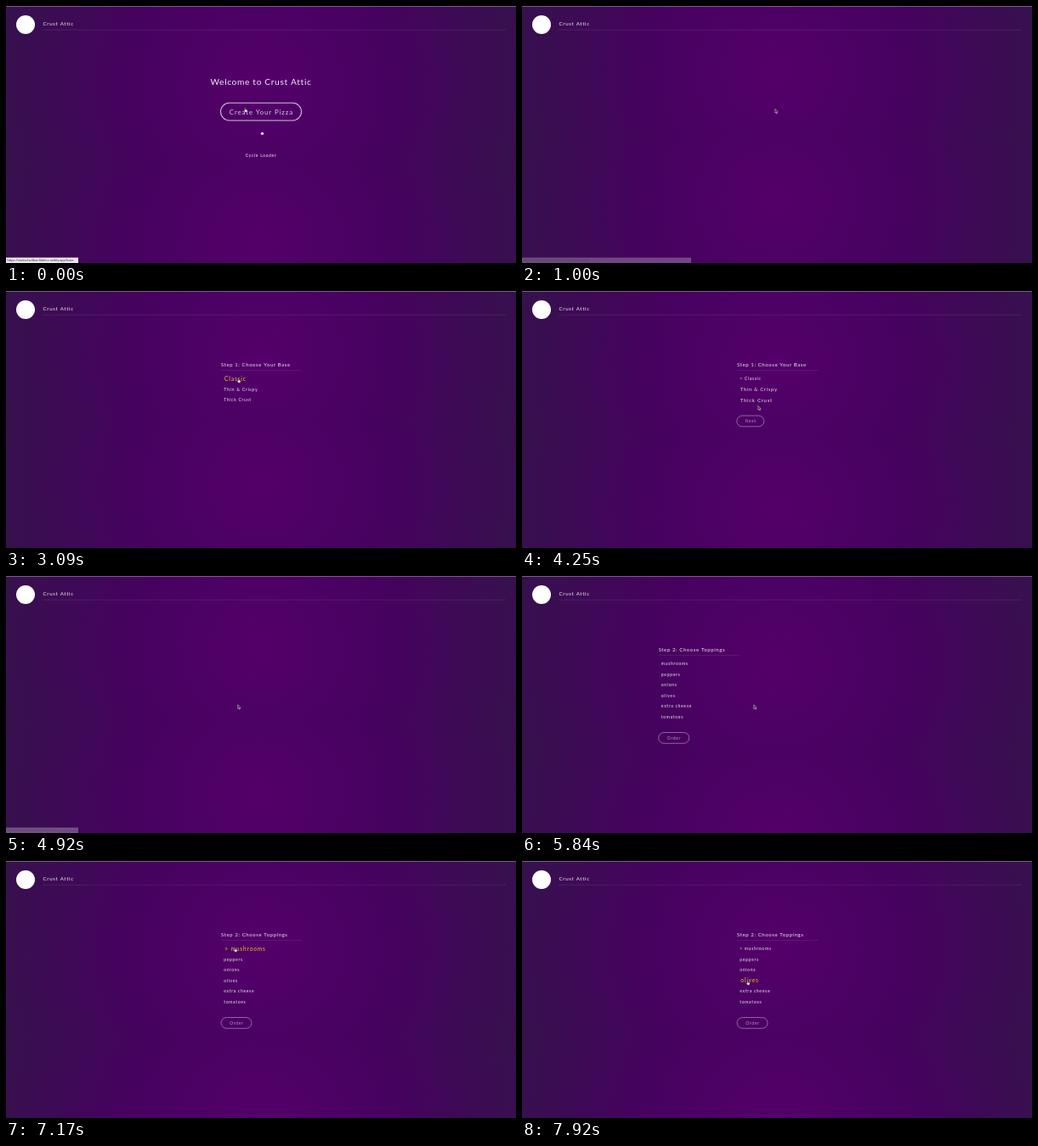
Animation, 600 px wide and 303 px high, one loop 8 s. Source, as an HTML page with a canvas:

```html
<!DOCTYPE html>
<html lang="en">
<head>
<meta charset="utf-8">
<title>Pizza order</title>
<style>
  html, body { margin: 0; width: 100%; height: 100%; overflow: hidden; background: #45055a; }
  canvas { display: block; width: 600px; height: 303px; }
</style>
</head>
<body>
<canvas></canvas>
<script>
const W = 600, H = 303, LOOP = 8000, LEFT = 253, ROW = 12.55, TRACKING = 0.65;
const canvas = document.querySelector('canvas');
const ctx = canvas.getContext('2d');
const dpr = window.devicePixelRatio || 1;
canvas.width = W * dpr;
canvas.height = H * dpr;

const BRAND = 'Crust Attic';
const SITE = 'https://stoked-willow-0a6fcc.netlify.app/';

const home = { exit: 504 };
const base = {
  title: 'Step 1: Choose Your Base', items: ['Classic', 'Thin & Crispy', 'Thick Crust'],
  enter: 1304, hoverFrom: 2080, picked: 3349, exit: 4698,
  button: { label: 'Next', y: 153.4, width: 32, slideIn: 3349 }
};
const toppings = {
  title: 'Step 2: Choose Toppings',
  items: ['mushrooms', 'peppers', 'onions', 'olives', 'extra cheese', 'tomatoes'],
  enter: 5510, hoverFrom: 6480, picked: 7150, exit: Infinity,
  button: { label: 'Order', y: 190.9, width: 36 }
};

// Pointer path: time, x, y
const pointerPath = [
  [0, 282, 122], [450, 282, 122], [1000, 299, 124], [1800, 299, 124], [2170, 298, 118],
  [2500, 296, 117], [3100, 274, 105], [3900, 272, 104], [4250, 279, 138], [4500, 273, 154],
  [5000, 274, 154.5], [6300, 274, 154.5], [6500, 272, 151], [6950, 270, 104], [7300, 270, 104],
  [7800, 266, 143], [8000, 266, 143]
];

const clamp = v => Math.max(0, Math.min(1, v));
const lerp = (a, b, u) => a + (b - a) * u;
const easeInOut = u => u < 0.5 ? 2 * u * u : 1 - 2 * (1 - u) ** 2;

// Remaining distance (1 to 0) of a damped spring
function spring(ms, stiffness) {
  if (ms <= 0) return 1;
  const s = ms / 1000, f = Math.sqrt(stiffness - 25);
  return Math.exp(-5 * s) * (Math.cos(f * s) + 5 / f * Math.sin(f * s));
}

const exitShift = (t, start) => -W * easeInOut(clamp((t - start) / 300));

function pointerAt(t) {
  const i = Math.max(1, pointerPath.findIndex(p => p[0] >= t));
  const [t0, x0, y0] = pointerPath[i - 1], [t1, x1, y1] = pointerPath[i];
  const u = clamp((t - t0) / (t1 - t0)), s = u * u * (3 - 2 * u);
  return { x: lerp(x0, x1, s), y: lerp(y0, y1, s) };
}

const rowY = i => 103.2 + i * ROW;

function isOver(page, i, t) {
  if (t < page.hoverFrom || t > page.exit) return false;
  const p = pointerAt(t);
  return p.x > LEFT && p.x < 348 && Math.abs(p.y - rowY(i)) < ROW / 2;
}

// Hover strength follows the recent pointer position
function hoverAmount(page, i, t) {
  let hits = 0;
  for (let k = 0; k < 13; k++) hits += isOver(page, i, t - k * 20);
  return hits / 13;
}

function text(str, x, y, size, { color = 'rgba(255,255,255,0.92)', weight = 400, spacing = TRACKING, align = 'left', family = 'Lato' } = {}) {
  ctx.font = `${weight} ${size}px ${family}, sans-serif`;
  ctx.letterSpacing = spacing + 'px';
  ctx.textAlign = align;
  ctx.textBaseline = 'alphabetic';
  ctx.fillStyle = color;
  ctx.fillText(str, x, y + size * 0.34);
}

function line(x0, x1, y) {
  ctx.fillStyle = 'rgba(255,255,255,0.14)';
  ctx.fillRect(x0, y, x1 - x0, 0.6);
}

function pill(x, y, w, h, lineWidth, color) {
  ctx.beginPath();
  ctx.roundRect(x, y, w, h, h / 2);
  ctx.lineWidth = lineWidth;
  ctx.strokeStyle = color;
  ctx.stroke();
}

function disc(x, y, r) {
  ctx.beginPath();
  ctx.arc(x, y, r, 0, 2 * Math.PI);
  ctx.fillStyle = '#fff';
  ctx.fill();
}

// The glow repeats with the height of the page content
function drawBackground(t) {
  const tile = t < 804 ? 186 : t < base.picked ? 152 : t < 4998 ? 171 : 208;
  for (let y = 0; y < H; y += tile) {
    const cy = y + tile / 2;
    const glow = ctx.createRadialGradient(W / 2, cy, 0, W / 2, cy, Math.hypot(W / 2, tile / 2));
    glow.addColorStop(0, 'rgb(84,0,106)');
    glow.addColorStop(0.5, 'rgb(70,2,95)');
    glow.addColorStop(1, 'rgb(54,17,77)');
    ctx.fillStyle = glow;
    ctx.fillRect(0, y, W, tile);
  }
  ctx.fillStyle = 'rgba(255,255,255,0.4)';
  ctx.fillRect(0, 0, W, 0.8);
}

function drawHeader() {
  disc(23, 22, 11);
  text(BRAND, 43.5, 21.3, 6.2);
  line(43, 588, 27.8);
}

function drawHome(t) {
  if (t > home.exit + 300) return;
  ctx.save();
  ctx.translate(W / 2 + exitShift(t, home.exit), 0);
  text('Welcome to ' + BRAND, 0, 89.5, 10.2, { align: 'center' });

  ctx.save();
  const pulse = 1 + 0.05 * Math.sin(t / 600 * 2 * Math.PI);
  ctx.translate(0, 124.6);
  ctx.scale(pulse, pulse);
  pill(-47.5, -10.3, 95, 20.6, 1, 'rgba(255,255,255,0.75)');
  text('Create Your Pizza', 0.4, 0.4, 7.8, { align: 'center', color: 'rgba(255,255,255,0.8)', spacing: 0.9 });
  ctx.restore();

  const phase = t / 1000 * 2 * Math.PI + 0.24;
  disc(6.2 * Math.sin(phase), 159.2 - 9.4 * Math.cos(phase) ** 2, 1.6);
  text('Cycle Loader', 0, 176.2, 5.1, { align: 'center' });
  ctx.restore();
}

function drawButton({ label, y, width, slideIn }, t) {
  const shift = slideIn ? -W * spring(t - slideIn, 110) : 0;
  const x = LEFT + shift;
  pill(x, y - 6.4, width, 12.8, 0.7, 'rgba(255,255,255,0.55)');
  text(label, x + width / 2 + 0.3, y + 0.2, 5, { align: 'center', color: 'rgba(255,255,255,0.6)' });
}

function drawMenu(page, t) {
  if (t < page.enter || t > page.exit + 300) return;
  const rest = spring(t - page.enter, 100);
  ctx.save();
  ctx.globalAlpha = clamp(1 - rest);
  ctx.translate(W * rest + exitShift(t, page.exit), 0);
  text(page.title, LEFT, 86.8, 5.9);
  line(LEFT, 348, 93.2);
  page.items.forEach((item, i) => {
    const hover = hoverAmount(page, i, t), tint = hover ** 3;
    const scale = 1 + 0.3 * Math.sin(hover * Math.PI / 2);
    const label = i === 0 && t >= page.picked ? '> ' + item : item;
    ctx.save();
    ctx.translate(LEFT, rowY(i));
    ctx.scale(scale, scale);
    text(label, 3.2, 0.2, 5.1, { color: `rgba(${lerp(255, 248, tint)},${lerp(255, 225, tint)},${lerp(255, 18, tint)},0.9)` });
    ctx.restore();
  });
  drawButton(page.button, t);
  ctx.restore();
}

function drawStatus(t) {
  const first = t < 1090;
  const alpha = first ? clamp((1080 - t) / 200) : clamp((t - 4420) / 80) * clamp((5000 - t) / 250);
  if (!alpha) return;
  const wide = first && t > 900;
  ctx.save();
  ctx.globalAlpha = alpha;
  ctx.fillStyle = wide ? '#b9a9c2' : '#ebe7ee';
  ctx.fillRect(0, 296.6, wide ? 199 : 85, 6.4);
  text(SITE + (first ? 'base' : 'toppings'), 1.5, 299.7, 3.9, { color: '#3b3440', spacing: 0, family: 'Roboto' });
  ctx.restore();
}

function overControl(t, { y }) {
  if (t < home.exit) return true;
  if (t > 4400 && t < base.exit) return Math.abs(y - base.button.y) < 6.5;
  return [base, toppings].some(page => page.items.some((_, i) => isOver(page, i, t)));
}

function drawPointer(t) {
  const p = pointerAt(t);
  ctx.save();
  ctx.translate(p.x, p.y);
  ctx.lineWidth = 0.6;
  ctx.lineJoin = 'round';
  const hand = overControl(t, p);
  const shape = hand
    ? 'M-1.3-1.8 L-.4-2 L0 0 L2 .4 L2 2 L1.3 3.2 L-.6 3.2 L-2.2 1 L-1.6.6 L-.8 1 Z'
    : 'M-1.2-2.6 L-1.2 2 L-.2 1.2 L.6 2.8 L1.3 2.5 L.6 1 L2 .9 Z';
  const path = new Path2D(shape);
  ctx.fillStyle = hand ? '#fff' : '#1c1420';
  ctx.strokeStyle = hand ? '#3a2a42' : 'rgba(255,255,255,0.8)';
  ctx.fill(path);
  ctx.stroke(path);
  ctx.restore();
}

function draw(now) {
  const t = now % LOOP;
  ctx.setTransform(dpr, 0, 0, dpr, 0, 0);
  drawBackground(t);
  drawHeader();
  drawHome(t);
  drawMenu(base, t);
  drawMenu(toppings, t);
  drawStatus(t);
  drawPointer(t);
}

const start = performance.now();
function tick() {
  draw(performance.now() - start);
  requestAnimationFrame(tick);
}
tick();
</script>
</body>
</html>
```
